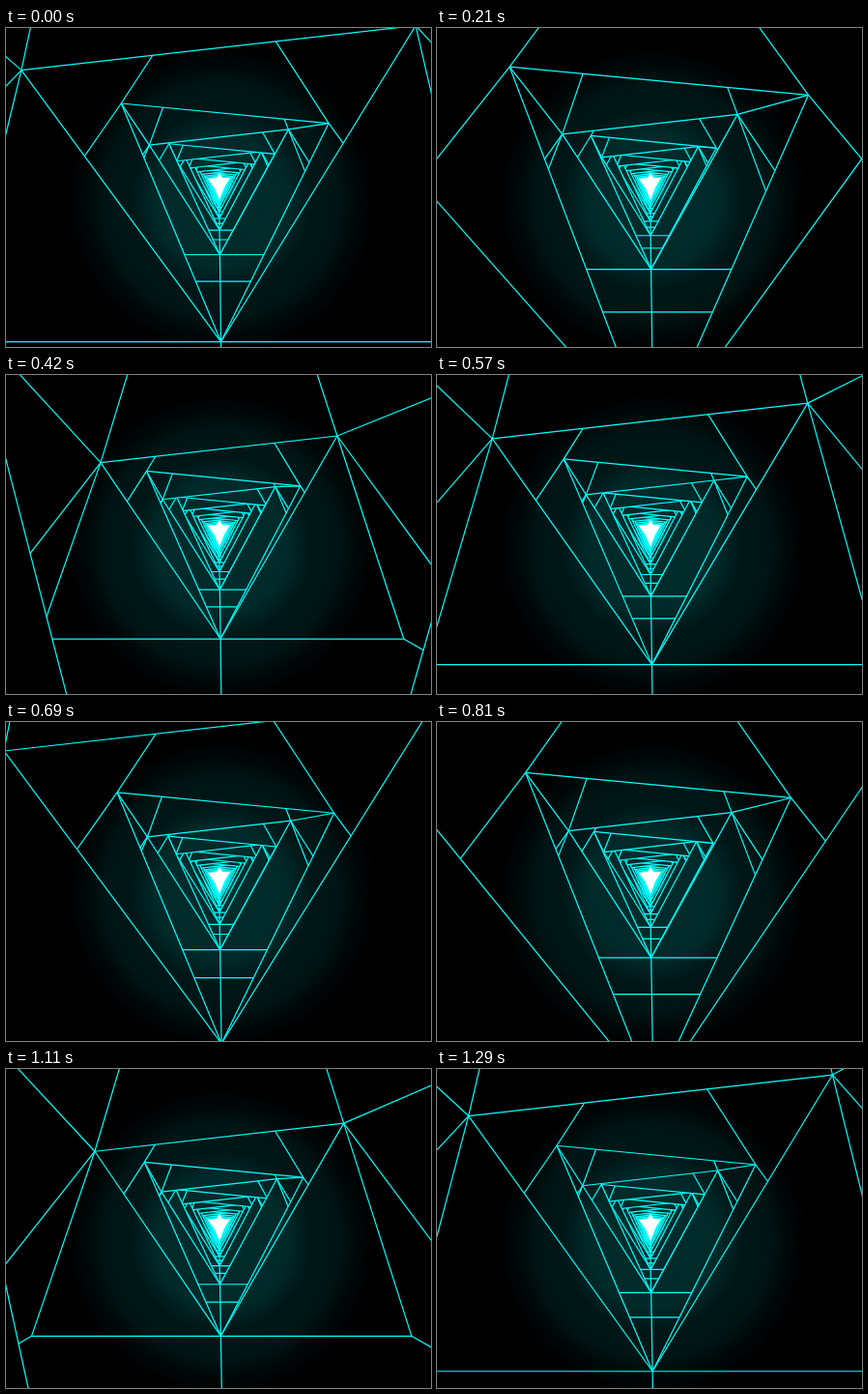
Recreate the animation shown at these times as an HTML page with a canvas. Size 440 by 330 pixels, loop 1.32 s.

```html
<!DOCTYPE html>
<html lang="en">
<head>
<meta charset="utf-8">
<title>Triangle tunnel</title>
<style>
html, body { margin: 0; width: 100%; height: 100%; overflow: hidden; background: #000; }
canvas { display: block; }
</style>
</head>
<body>
<canvas id="stage" width="440" height="330"></canvas>
<script>
const W = 440, H = 330, LOOP = 1320, STEP = 30, CELL_TIME = 660;
const CENTER = { x: 220.5, y: 163.4 };
const NEAR = 0.02, CELLS = 22;
const ctx = document.getElementById('stage').getContext('2d');

// Corners of one tunnel cell as [x, y, depth]; cells repeat at depth 1.
const CELL = {
  frontL: [-111.5, -65.3, 0.545], frontR: [111, -90.4, 0.545],
  backL: [-106, -89.4, 1.047], backR: [117.8, -67.2, 1.037],
  keel: [1.6, 127.3, 0.79],
  wideL: [-215.5, 127.3, 0.79], wideR: [220.5, 127.3, 0.79],
  footL: [-215.5, 127.3, 0.29], footR: [220.5, 127.3, 0.29],
  roof: [0, -310, 0.29]
};

const glow = ctx.createRadialGradient(223, 178, 0, 223, 178, 160);
[[0, 44], [0.42, 42], [0.58, 23], [0.76, 20], [0.86, 9], [1, 0]].forEach(([stop, v]) =>
  glow.addColorStop(stop, `rgb(0,${v},${v})`));

const project = ([x, y, z]) => [CENTER.x + x / z, CENTER.y + y / z];

function placeCell(k, time) {
  const shift = k - (time % CELL_TIME) / CELL_TIME;
  const cell = {};
  for (const [name, [x, y, z]] of Object.entries(CELL)) {
    cell[name] = [x + 0.00045 * time, y - 0.00195 * time, z + shift];
  }
  return cell;
}

function toNear(a, b) {
  if (a[2] >= NEAR) return a;
  const f = (NEAR - a[2]) / (b[2] - a[2]);
  return a.map((v, i) => v + (b[i] - v) * f);
}

function line(a, b) {
  if (a[2] < NEAR && b[2] < NEAR) return;
  ctx.beginPath();
  ctx.moveTo(...project(toNear(a, b)));
  ctx.lineTo(...project(toNear(b, a)));
  ctx.stroke();
}

const fan = (from, ...ends) => ends.forEach(end => line(from, end));

// Outlines an opening, then hides whatever lies outside it further on.
function opening(...corners) {
  corners.forEach((c, i) => line(c, corners[(i + 1) % 3]));
  if (corners.some(c => c[2] < 0.05)) return;
  ctx.beginPath();
  corners.forEach(c => ctx.lineTo(...project(c)));
  ctx.closePath();
  ctx.clip();
}

function drawCore() {
  const halo = ctx.createRadialGradient(221, 163, 2, 221, 163, 18);
  halo.addColorStop(0, 'rgba(0,255,255,0.9)');
  halo.addColorStop(0.5, 'rgba(0,255,255,0.4)');
  halo.addColorStop(1, 'rgba(0,255,255,0)');
  ctx.fillStyle = halo;
  ctx.fillRect(200, 142, 42, 42);
  ctx.fillStyle = '#fff';
  ctx.beginPath();
  [[209, 156], [218, 155], [221, 150], [224, 155], [232, 155],
    [226, 165], [221, 178], [216, 166]].forEach(([x, y]) => ctx.lineTo(x, y));
  ctx.fill();
}

function draw(time) {
  ctx.fillStyle = '#000';
  ctx.fillRect(0, 0, W, H);
  ctx.fillStyle = glow;
  ctx.fillRect(0, 0, W, H);

  ctx.save();
  ctx.strokeStyle = '#0ff';
  ctx.lineWidth = 1.2;
  let last = placeCell(-1, time);
  for (let k = 0; k < CELLS; k++) {
    const c = placeCell(k, time), next = placeCell(k + 1, time);
    line(last.keel, c.keel);
    line(c.footL, c.footR);
    line(c.wideL, c.wideR);
    fan(c.frontL, last.backL, c.roof, c.wideL, c.footL);
    fan(c.frontR, last.backR, c.roof, c.wideR, c.footR);
    line(c.wideL, c.footL);
    line(c.wideR, c.footR);
    opening(c.frontL, c.frontR, c.keel);
    fan(c.backL, next.roof, c.wideL);
    fan(c.backR, next.roof, c.wideR);
    opening(c.backL, c.backR, c.keel);
    last = c;
  }
  ctx.restore();
  drawCore();
}

const start = performance.now();
function tick() {
  const elapsed = (performance.now() - start) % LOOP;
  draw(Math.floor(elapsed / STEP) * STEP);
  requestAnimationFrame(tick);
}
tick();
</script>
</body>
</html>
```
